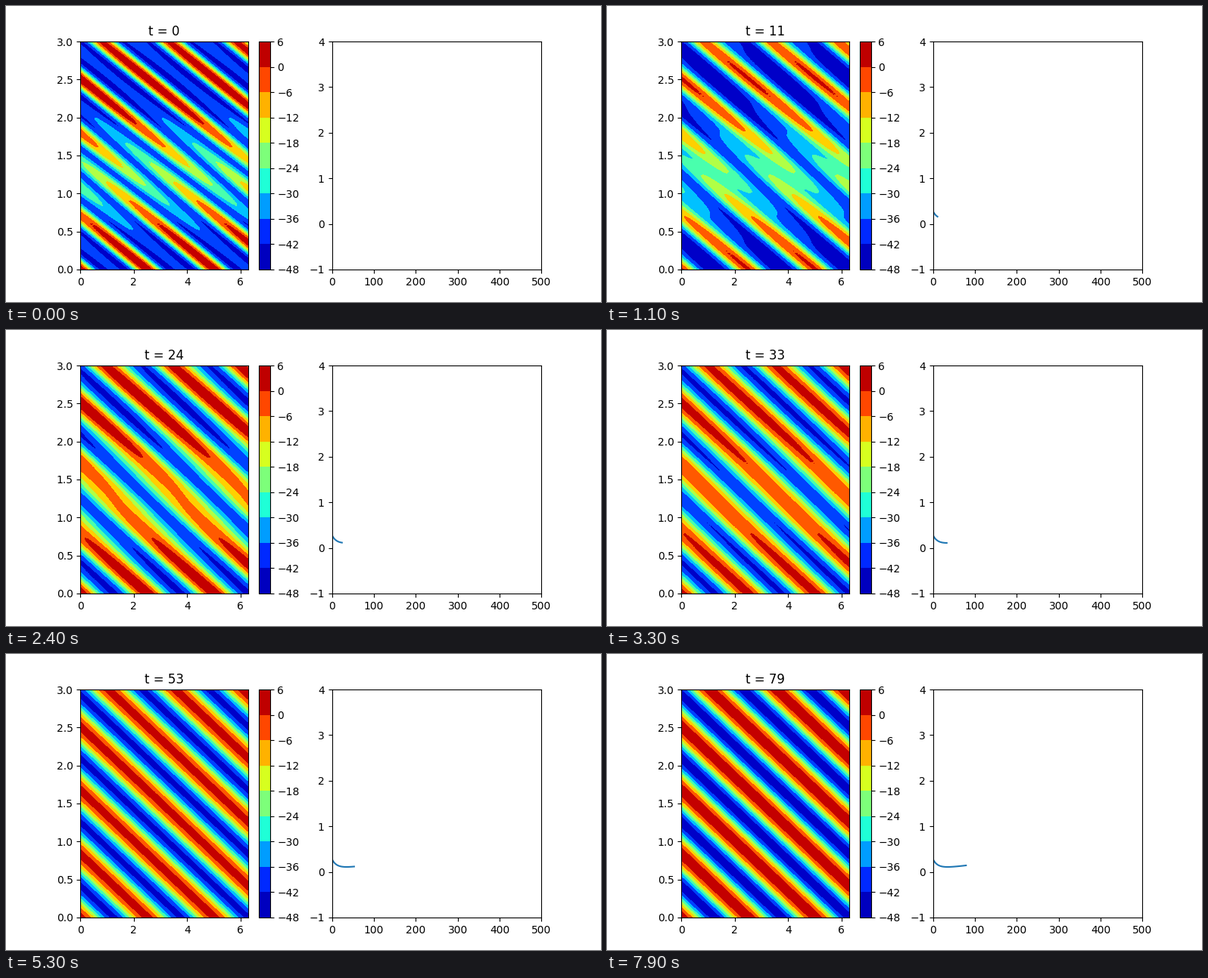
A matplotlib script for the animation above (8000 ms loop, 786 by 392 pixels).

```python
import numpy as np
import matplotlib.pyplot as plt
from matplotlib.animation import FuncAnimation
from matplotlib.cm import ScalarMappable
from matplotlib.colors import BoundaryNorm, ListedColormap

FRAMES = 80
INTERVAL = 100
K = 2.5
STEPS = (0.5, 0.6, 0.8, 1.0)

x, y = np.meshgrid(np.linspace(0, 2 * np.pi, 101), np.linspace(0, 3, 101))
wave_a = np.cos(K * (x + 3 * y))
wave_b = np.cos(K * (x + 4 * y))
wave_c = np.cos(K * (2 * x + 7 * y))

times = np.arange(FRAMES)
energy = 0.075 * np.exp(0.008 * times) + 0.205 * np.exp(-0.09 * times)


def field(t):
    """Three interacting waves: one grows slowly, two die out."""
    a = 1.646 + 0.0068 * t
    b = 1.646 * np.exp(-0.039 * t - 0.0011 * t * t)
    c = 1.646 * np.exp(-0.071 * t - 0.001 * t * t)
    return a * wave_a + b * wave_b + c * wave_c


def nice_levels(z):
    lo, hi = z.min(), z.max()
    step = next((s for s in STEPS if hi - lo <= 8 * s), STEPS[-1])
    return step * np.arange(np.floor(lo / step), np.ceil(hi / step) + 1)


def band_colors(n):
    return plt.get_cmap("jet")((np.arange(n) + 0.5) / n)


fig, (ax, ax_energy) = plt.subplots(1, 2, figsize=(7.86, 3.92), dpi=100)

bounds = np.arange(-48, 7, 6)
bands = len(bounds) - 1
scale = ScalarMappable(BoundaryNorm(bounds, bands), ListedColormap(band_colors(bands)))
bar = fig.colorbar(scale, ax=ax, ticks=bounds)
bar.minorticks_off()

ax.set_xlim(0, 2 * np.pi)
ax.set_ylim(0, 3)
title = ax.set_title("t = 0")

ax_energy.set_xlim(0, 500)
ax_energy.set_ylim(-1, 4)
line, = ax_energy.plot([], [])

contours = None


def update(t):
    global contours
    if contours is not None:
        contours.remove()
    z = field(t)
    levels = nice_levels(z)
    contours = ax.contourf(x, y, z, levels=levels,
                           colors=band_colors(len(levels) - 1))
    title.set_text(f"t = {t}")
    line.set_data(times[:t + 1], energy[:t + 1])
    return contours, title, line


anim = FuncAnimation(fig, update, frames=FRAMES, interval=INTERVAL,
                     init_func=lambda: update(0), repeat=True,
                     repeat_delay=0, blit=False)
plt.show()
```
